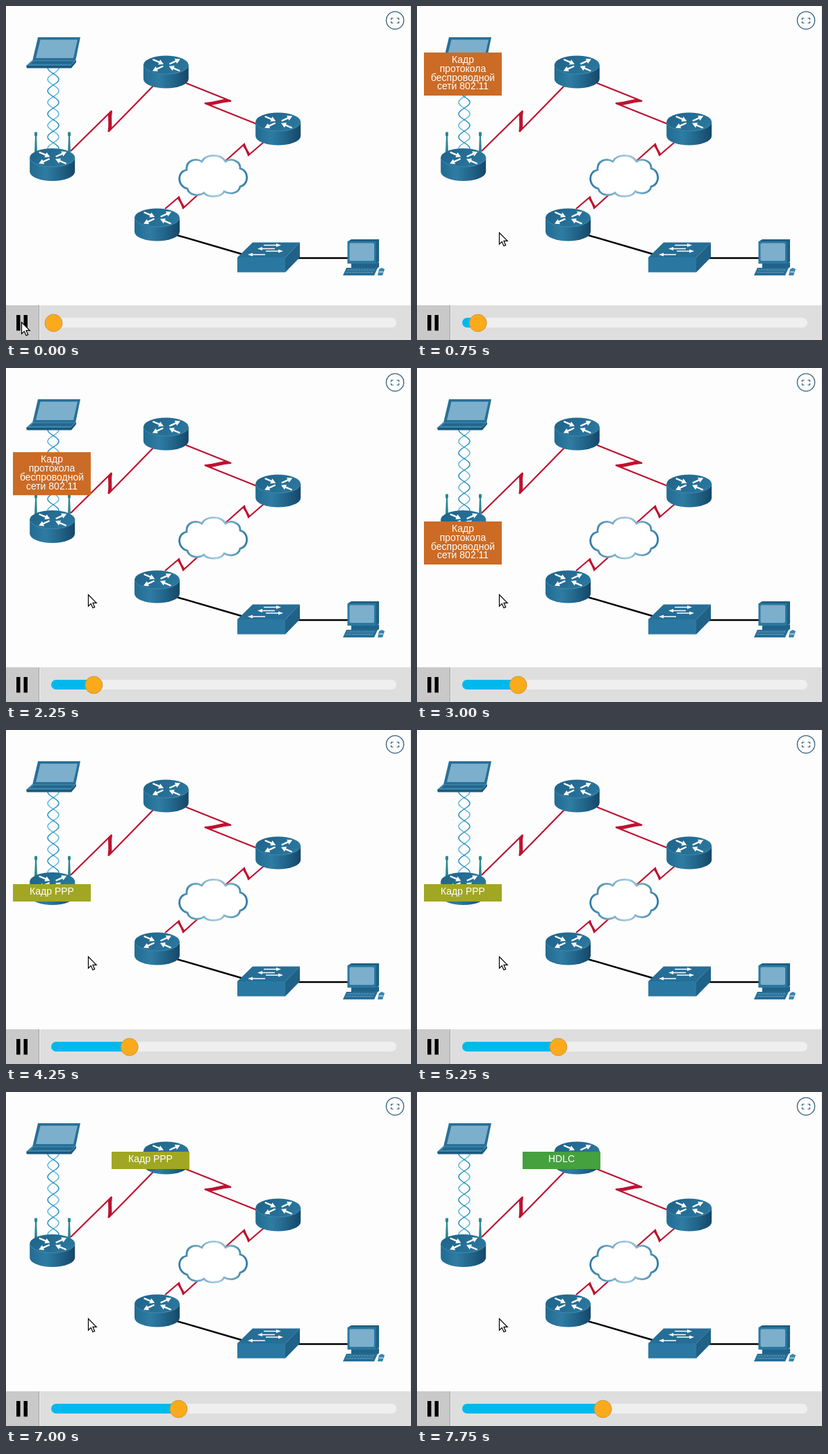
An HTML page that plays this animation: 583x481 px, repeating every 8000 ms.

```html
<!DOCTYPE html>
<html lang="ru">
<head>
<meta charset="utf-8">
<style>
  html, body { margin: 0; width: 100%; height: 100%; overflow: hidden; background: #fdfdfd; }
  svg { display: block; }
  text { font: 14px "Liberation Sans", Arial, sans-serif; fill: #fff; text-anchor: middle; }
  .link { fill: none; stroke: #bd1230; stroke-width: 2.2; stroke-miterlimit: 3; }
  .bolt { fill: #bd1230; }
  .wire { stroke: #000; stroke-width: 2.4; }
</style>
</head>
<body>
<svg width="583" height="481" viewBox="0 0 583 481">
  <defs>
    <linearGradient id="side">
      <stop offset="0" stop-color="#226b93"/>
      <stop offset=".35" stop-color="#2f7ca3"/>
      <stop offset=".65" stop-color="#22668c"/>
      <stop offset="1" stop-color="#154767"/>
    </linearGradient>
    <linearGradient id="lid" x2="1" y2=".4">
      <stop offset="0" stop-color="#1f6289"/>
      <stop offset="1" stop-color="#2a769d"/>
    </linearGradient>
    <linearGradient id="rim">
      <stop offset="0" stop-color="#2f7ba6"/>
      <stop offset=".55" stop-color="#a9cde0"/>
      <stop offset="1" stop-color="#2f7ba6"/>
    </linearGradient>
    <!-- arrows point right from the origin -->
    <path id="arrow" d="M0-1.200H10V-4L17 0L10 4V1.200H0Z" fill="#fff"/>
    <path id="thin" d="M0-.8H18V-2.600L25 0L18 2.600V.8H0Z" fill="#fff"/>
    <g id="router">
      <path d="M-32.500 0V20A32.500 13.500 0 0 0 32.500 20V0Z" fill="url(#side)"/>
      <ellipse rx="32.500" ry="13.500" fill="url(#lid)"/>
      <path d="M-32.300 1A32.500 13.500 0 0 0 32.300 1" fill="none" stroke="#4b8fb2" stroke-width=".8"/>
      <use href="#arrow" transform="translate(-19 -8) rotate(23)"/>
      <use href="#arrow" transform="translate(5 -1.500) rotate(-24)"/>
      <use href="#arrow" transform="translate(-4 1.500) rotate(156)"/>
      <use href="#arrow" transform="translate(20 8.500) rotate(203)"/>
    </g>
    <g id="antenna">
      <path d="M-1 5H1L2 29H-2Z" fill="#2b8791"/>
      <rect x="-2" width="4" height="6" rx="1" fill="#2b8791"/>
    </g>
  </defs>

  <path d="M582.5 0V431" stroke="#e4e4e4"/>

  <g fill="none" stroke="#35617a">
    <circle cx="560" cy="20.700" r="12.600" fill="#fff" stroke-width="1.300"/>
    <path d="M557.5 17.500H554.5V20M562.5 17.500H565.5V20M554.5 22V24.500H557.5M565.5 22V24.500H562.5" stroke-width="1.200"/>
  </g>

  <g fill="none" stroke-width="1.500">
    <path id="strandA" stroke="#5fb4da"/>
    <path id="strandB" stroke="#2490c4"/>
  </g>

  <g id="laptop">
    <path d="M46 45H107L100 79H38Z" fill="#286f97"/>
    <path d="M49.500 48.500H103L97 75H43Z" fill="#7cafcb"/>
    <path d="M38 78H101L94 86H29Z" fill="#3a85ab"/>
    <path d="M40 79.500H98L94 83.500H35Z" fill="#23658b"/>
    <path d="M29 86H93L101 78V81L94 89.500H30Z" fill="#1b587d"/>
  </g>

  <g id="links"></g>
  <path class="wire" d="M246 330L342 358M420 363H493"/>

  <path d="M261 263C247 260 245 239 260 236C259 223 272 218 282 224C287 213 309 212 316 224C325 218 338 224 337 234C350 237 350 257 337 260C335 270 322 272 314 267C310 276 290 276 285 269C277 275 263 272 261 263Z"
    fill="#fff" stroke="url(#rim)" stroke-width="2.800"/>

  <use href="#antenna" x="43" y="181.500"/>
  <use href="#antenna" x="91" y="181.500"/>
  <use href="#router" x="66.700" y="218.500"/>
  <use href="#router" x="230.300" y="85"/>
  <use href="#router" x="391.700" y="167"/>
  <use href="#router" x="217.500" y="305"/>

  <g id="switch">
    <path d="M333 362L355 340.500H423L402 362Z" fill="#266e96"/>
    <path d="M333 362H402V383.500H333Z" fill="#2a78a2"/>
    <path d="M402 362L423 340.500V362L402 383.500Z" fill="#1f6187"/>
    <use href="#thin" x="371" y="344.500"/>
    <use href="#thin" transform="translate(387 349.500) rotate(180)"/>
    <use href="#thin" x="374" y="353"/>
    <use href="#thin" transform="translate(373 358) rotate(180)"/>
  </g>

  <g id="desktop">
    <path d="M492 339L497 336H537V368L532 372Z" fill="#1f6187"/>
    <path d="M491.500 339H532.500V371H491.500Z" fill="#2b78a0"/>
    <rect x="494.500" y="341.500" width="35.500" height="25.500" rx="2" fill="#7cafcb"/>
    <path d="M497 371H532L537 369V376L532 379H497Z" fill="#21638a"/>
    <path d="M490 377H535L530 388H485Z" fill="#286f97"/>
    <path d="M491 380H530M489.500 383.500H528" stroke="#6ba4c3" stroke-dasharray="3 1"/>
    <path d="M537 379L541 377L545 379L542 388H535Z" fill="#3a85ab"/>
    <path d="M537 383H543" stroke="#fff"/>
  </g>

  <rect y="431" width="583" height="50" fill="#dedede"/>
  <rect y="431" width="47" height="50" fill="#c9c9c9"/>
  <path d="M47.500 431V481" stroke="#a0a0a0"/>
  <path d="M48.500 431V481" stroke="#f2f2f2"/>
  <path d="M15 445H20.500V467.500H15ZM25.500 445H31V467.500H25.500Z"/>
  <rect x="65" y="449" width="497" height="14" rx="7" fill="#efeff0"/>
  <rect id="fill" x="65" y="449" height="14" rx="7" fill="#00b9ec"/>
  <circle id="knob" cy="456.500" r="12.500" fill="#fbaa1b" stroke="#c9933c" stroke-width=".9"/>

  <g id="label"></g>
  <path id="cursor" d="M.5.5V17L4.300 13.400L7 19.500L9.700 18.400L7 12.300H12.200Z" fill="#fff" stroke="#000" stroke-width="1.200"/>
</svg>

<script>
const LOOP = 8000, STEP = 250;
const el = id => document.getElementById(id);
const place = (node, x, y) => node.setAttribute('transform', `translate(${x} ${y})`);

// double helix between laptop and access point
const strand = sign => {
  let d = '';
  for (let y = 89; y <= 206; y++)
    d += `${d ? 'L' : 'M'}${68 + sign * 8 * Math.cos(Math.PI * (y - 89) / 16.6)} ${y}`;
  return d;
};
el('strandA').setAttribute('d', strand(1));
el('strandB').setAttribute('d', strand(-1));

// serial link: start, two bolt tips, end, bolt thickness along the line
const links = [
  [[93, 209], [152, 151], [147.5, 181], [212, 115], 7],
  [[259, 111], [324, 137], [286, 140], [361, 170], 9],
  [[371, 196], [349, 215], [343, 199], [316, 223], 3],
  [[276, 272], [255, 291], [249, 275], [229, 292], 3]
];
const toward = (p, q, distance) => {
  const k = distance / Math.hypot(q[0] - p[0], q[1] - p[1]);
  return p.map((v, i) => v + (q[i] - v) * k);
};
el('links').innerHTML = links.map(([a, p, q, b, w]) =>
  `<path class="link" d="M${a}L${p}L${q}L${b}"/>` +
  `<path class="bolt" d="M${p}L${toward(p, a, w)}L${q}L${toward(q, b, w)}Z"/>`
).join('');

const labels = [
  { from: 750, height: 62, color: '#cb6b25', lines: ['Кадр', 'протокола', 'беспроводной', 'сети 802.11'] },
  { from: 4000, height: 25, color: '#a1a722', lines: ['Кадр PPP'] },
  { from: 7750, height: 25, color: '#45a03e', lines: ['HDLC'] }
];
let shown;
function showLabel(label) {
  if (label === shown) return;
  shown = label;
  el('label').innerHTML = label
    ? `<rect width="112" height="${label.height}" fill="${label.color}"/>` +
      label.lines.map((line, i) => `<text x="56" y="${15 + i * 12.8}">${line}</text>`).join('')
    : '';
}

const ease = (t, start, end) => {
  const u = Math.min(1, Math.max(0, (t - start) / (end - start)));
  return u * u * (3 - 2 * u);
};

function draw(t) {
  const knobX = 68.5 + 0.0257 * t;
  el('knob').setAttribute('cx', knobX);
  el('fill').setAttribute('width', knobX - 65);

  const away = ease(t, 0, 750);
  place(el('cursor'), 22 + 96 * away, 455 - 129 * away);

  showLabel(labels.findLast(label => t >= label.from));
  const down = ease(t, 1750, 3000), across = ease(t, 5250, 6720);
  const bend = 46 * across * (1 - across);
  place(el('label'), 10 + 142 * across - bend, 67 + 154 * down + (t >= 4000) - 136 * across);
}

function tick() {
  const t = performance.now() % LOOP;
  draw(Math.floor(t / STEP) * STEP);
  requestAnimationFrame(tick);
}
tick();
</script>
</body>
</html>
```
